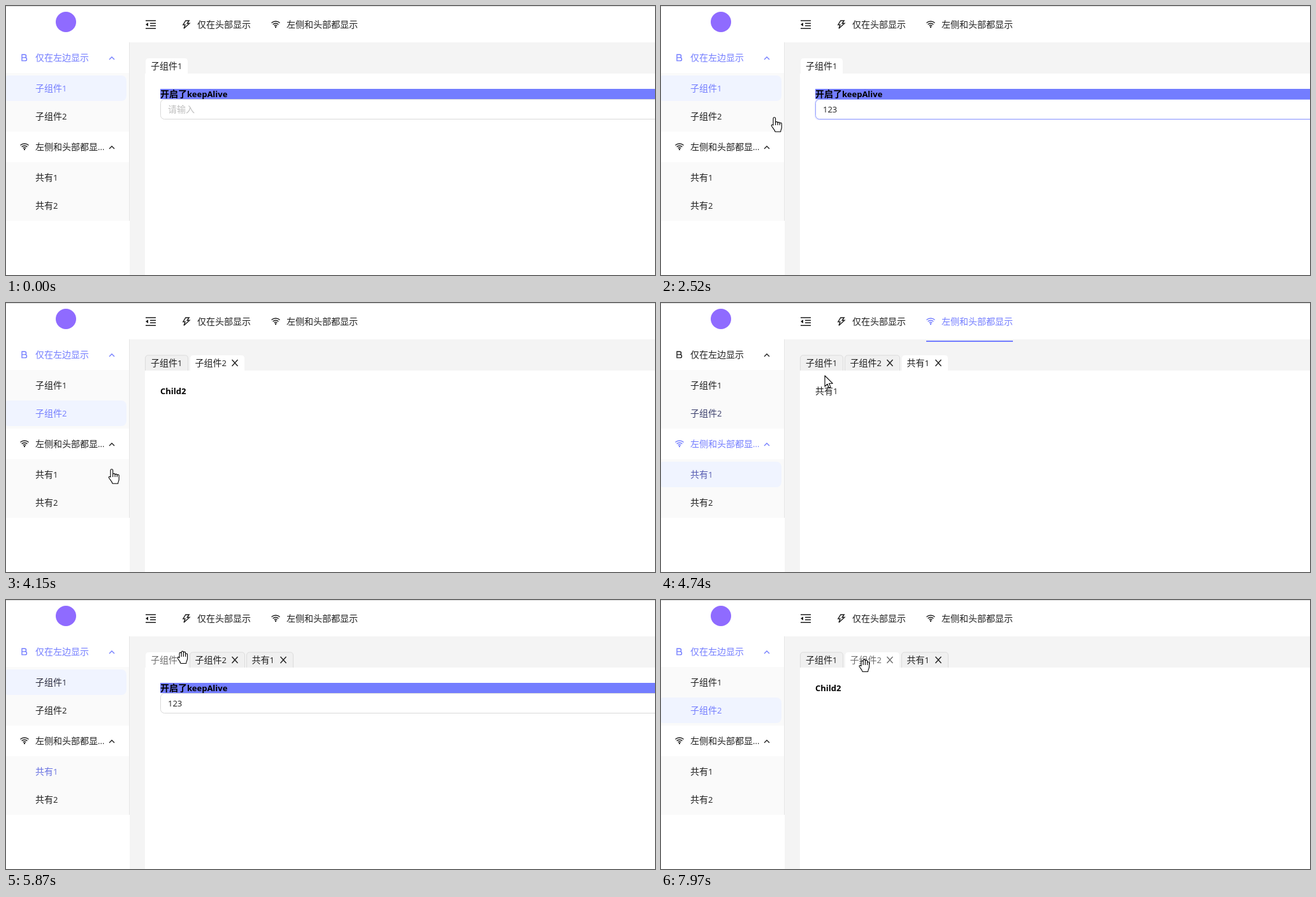
Write an HTML page that moves like this. It is 1018 by 422 pixels and loops after 7.99 s.

```html
<!DOCTYPE html>
<html lang="zh">
<head>
<meta charset="utf-8">
<style>
  html, body { margin: 0; width: 100%; height: 100%; overflow: hidden; background: #fff; }
  svg { display: block; }
  text { font: 14px "Open Sans", "Noto Sans CJK SC", "Noto Sans CJK", sans-serif; fill: currentColor; white-space: pre; }
  tspan { font-size: 13px; }
  .bold text { font-weight: 700; }
  .icon { fill: none; stroke: currentColor; stroke-width: 1.4; }
  .cursor { fill: #fff; stroke: #000; stroke-width: 1.1; stroke-linejoin: round; }
  #stage { color: #1f1f1f; }
</style>
</head>
<body>
<svg id="stage" width="1018" height="422" viewBox="0 0 1018 422"></svg>
<script>
const LOOP = 7990, PRIMARY = '#737dff', INK = '#1f1f1f';

// Clicks that select a page: [time, page]
const picks = [[-9999, 0], [2780, 1], [4200, 2], [5480, 0], [6880, 1]];
const typed = [[1450, '1'], [1560, '12'], [1680, '123']];

// Pointer path: [time, x, y]
const path = [
  [60, 960, 425], [400, 640, 310], [720, 432, 163], [900, 432, 163], [1200, 424, 162],
  [2100, 424, 162], [2500, 178, 175], [2910, 178, 175], [3180, 181, 180], [3420, 212, 222],
  [3700, 172, 252], [3950, 166, 261], [4330, 166, 261], [4720, 257, 114], [5320, 257, 114],
  [5450, 262, 98], [5600, 262, 98], [5800, 277, 90], [6120, 277, 90], [6420, 321, 89],
  [7060, 321, 89], [7280, 352, 92], [7530, 352, 92], [7800, 319, 103]
];

const cursors = {
  arrow: 'M0 0v17l4-3.8 2.6 6 2.6-1.1-2.6-5.9h5.6z',
  hand: 'M-2 1.5a1.8 1.8 0 0 1 3.6 0v6.5a1.6 1.6 0 0 1 3.4.6a1.6 1.6 0 0 1 3.2.8a1.5 1.5 0 0 1 3 .8v5.5c0 2.5-1.5 3.5-1.5 6.5h-8.7c-.5-3-3.8-6-5.6-9-.8-1.6 1-2.8 2.6-1.2zM1.6 8v4M5 8.6v3.4M8.2 9.4v2.6',
  grab: 'M-5-1v-5a1.6 1.6 0 0 1 3.2 0v-2a1.6 1.6 0 0 1 3.2 0v1a1.6 1.6 0 0 1 3.2 0v2.5a1.5 1.5 0 0 1 3 0v6c0 3.5-2 4.5-2 8h-8.6c-.5-3-3-5-4.8-8-.8-1.6 1-2.8 2.8-1zM-1.8-6v5M1.4-7v6M4.6-5v4',
  beam: 'M-3-8h2l1 1 1-1h2M0-7v14M-3 8h2l1-1 1 1h2'
};

const label = (x, mid, s, attrs = '') =>
  `<text x="${x}" y="${mid + 5}" ${attrs}>${s.replace(/[ -~]+/g, m => `<tspan>${m}</tspan>`)}</text>`;
const rect = (x, y, w, h, fill, attrs = '') =>
  `<rect x="${x}" y="${y}" width="${w}" height="${h}" fill="${fill}" ${attrs}/>`;
const icon = (d, x = 0, y = 0) => `<path class="icon" transform="translate(${x} ${y})" d="${d}"/>`;
const wifi = (x, y) =>
  icon('M-6.5-1.5a9.5 9.5 0 0 1 13 0M-4.4 1a6.4 6.4 0 0 1 8.8 0M-2.3 3.3a3.4 3.4 0 0 1 4.6 0', x, y) +
  `<circle cx="${x}" cy="${y + 5}" r="1.2" fill="currentColor"/>`;
const chevron = y => `<g stroke-width="2">${icon('M-4 2l4-4 4 4', 166, y)}</g>`;

const items = [[129, '子组件1'], [173, '子组件2'], [269, '共有1'], [313, '共有2']];
const tabs = [[218, 68, '子组件1'], [288, 87, '子组件2', 359], [377, 74, '共有1', 435]];

const tabShape = (x, w) => `M${x} 106v-19q0-5 5-5h${w - 10}q5 0 5 5v19`;
const tab = ([x, w, name, close], i) => `<g id="tab${i}">
  <path id="off${i}" d="${tabShape(x + .5, w - 1)}" fill="#f0f0f0" stroke="#dcdcdc"/>
  <path id="on${i}" d="${tabShape(x + 1, w - 2)}" fill="#fff"/>
  <g id="name${i}">${label(x + (i ? 8.5 : 9), 94, name)}
  ${close ? icon('M-4.5-5l9 10M4.5-5l-9 10', close, 94) : ''}</g></g>`;

stage.innerHTML = `
  ${rect(0, 0, 1018, 422, '#fff')}
  ${rect(194, 57, 824, 365, '#f4f4f4')}
  ${rect(218, 106, 800, 316, '#fff')}
  ${rect(0, 0, 1018, 1, '#dadada')}
  ${rect(0, 105, 193, 92, '#fafafa')}${rect(0, 245, 193, 92, '#fafafa')}
  ${rect(193, 57, 1, 280, '#e6e6e6')}
  <circle cx="94" cy="25" r="16" fill="#8f6bff"/>
  ${icon('M219 23h16M226 27.2h9M226 31h9M219 35.2h16')}
  <path d="M219 29l4-3v6z" fill="currentColor"/>
  ${icon('M281.8 23h5.4l-3 4.3h3.6l-8.8 7.9 2-5.7h-3.2z')}
  ${label(300, 29, '仅在头部显示')}
  <g id="top">${wifi(423, 28)}${label(440, 29, '左侧和头部都显示')}</g>
  ${rect(416, 59, 136, 2, PRIMARY, 'id="bar"')}
  <g id="groupA">
    ${icon('M25 76.3h4.3a2.3 2.3 0 0 1 0 4.6h-4.3zM25 80.9h5a2.5 2.5 0 0 1 0 5h-5z')}
    ${label(46, 81, '仅在左边显示')}${chevron(82)}
  </g>
  <g id="groupB">${wifi(29, 220)}${label(46, 221, '左侧和头部都显...')}${chevron(222)}</g>
  ${items.map(([y, s], i) =>
    rect(-4, y - 20, 193, 40, '#f0f4ff', `rx="8" id="back${i}"`) + label(46, y, s, `id="item${i}"`)).join('')}
  ${tabs.map(tab).join('')}
  <g id="page0">
    ${rect(242, 130, 776, 16, PRIMARY)}
    <g class="bold" color="#000">${label(242, 138, '开启了keepAlive')}</g>
    <rect id="glow" x="241.5" y="145.5" width="800" height="33" rx="7" fill="none" stroke="${PRIMARY}" stroke-opacity=".14" stroke-width="2"/>
    <rect id="field" x="242.5" y="146.5" width="800" height="31" rx="6" fill="#fff"/>
    <g id="hint" color="#bfbfbf">${label(254, 162, '请输入')}</g>
    <text id="value" x="254" y="167" style="font-size:13px"></text>
  </g>
  <g id="page1" class="bold" color="#000">${label(242, 138, 'Child2')}</g>
  <g id="page2">${label(242, 138, '共有1')}</g>
  <path id="pointer" class="cursor"/>`;

const $ = id => document.getElementById(id);
const show = (id, on) => $(id).style.display = on ? '' : 'none';
const tint = (id, k) => $(id).style.color = $(id).style.fill =
  id.startsWith('item') ? mix(k) : '';
const mix = k => `color-mix(in srgb, ${PRIMARY} ${k * 100}%, ${INK})`;
const ease = (t, a, b) => {
  const k = Math.min(1, Math.max(0, (t - a) / (b - a)));
  return k * k * (3 - 2 * k);
};

function pointerAt(t) {
  const n = path.findIndex(p => p[0] > t);
  if (n < 0) return path[path.length - 1].slice(1);
  if (n === 0) return path[0].slice(1);
  const [a, ax, ay] = path[n - 1], [b, bx, by] = path[n], k = ease(t, a, b);
  return [ax + (bx - ax) * k, ay + (by - ay) * k];
}

function cursorKind(t, x, y, page) {
  if (y > 82 && y < 106 && x > 218) return t > 6300 && t < 7600 ? 'hand' : 'grab';
  if (x < 190 && y > 105) return 'hand';
  return page === 0 && x > 242 && y > 147 && y < 178 ? 'beam' : 'arrow';
}

function draw(t) {
  const n = picks.filter(p => p[0] <= t).length - 1;
  const [start, page] = picks[n], last = n ? picks[n - 1][1] : -1, age = t - start;
  // How far page i is lit when the fade runs from a to b after the click
  const lit = (test, a, b) => {
    const k = ease(age, a, b);
    return (test(page) ? k : 0) + (test(last) ? 1 - k : 0);
  };
  const [x, y] = pointerAt(t), kind = cursorKind(t, x, y, page);

  items.forEach((_, i) => {
    $('back' + i).style.opacity = lit(p => p === i, 40, 280);
    tint('item' + i, lit(p => p === i, 300, 700));
  });
  const shared = lit(p => p === 2, 100, 380);
  $('groupA').style.color = mix(1 - shared);
  $('groupB').style.color = $('top').style.color = mix(shared);
  $('bar').style.opacity = shared;

  tabs.forEach(([tx, w], i) => {
    show('tab' + i, i === 0 || n >= i);
    show('on' + i, page === i);
    show('off' + i, page !== i);
    show('page' + i, page === i);
    const over = y > 82 && y < 106 && x > tx && x < tx + w;
    $('name' + i).style.opacity = over ? .65 : 1;
  });

  const focus = t > 1000 && t < 2780;
  const text = typed.filter(p => p[0] <= t).pop();
  $('value').textContent = text ? text[1] : '';
  show('hint', !text);
  show('glow', focus);
  $('field').setAttribute('stroke', focus || kind === 'beam' ? '#929dff' : '#d9d9d9');

  show('pointer', t >= 60);
  $('pointer').setAttribute('d', cursors[kind]);
  $('pointer').setAttribute('transform', `translate(${Math.round(x)} ${Math.round(y)})`);
}

function tick(now) {
  draw(now % LOOP);
  requestAnimationFrame(tick);
}
requestAnimationFrame(tick);
</script>
</body>
</html>
```
